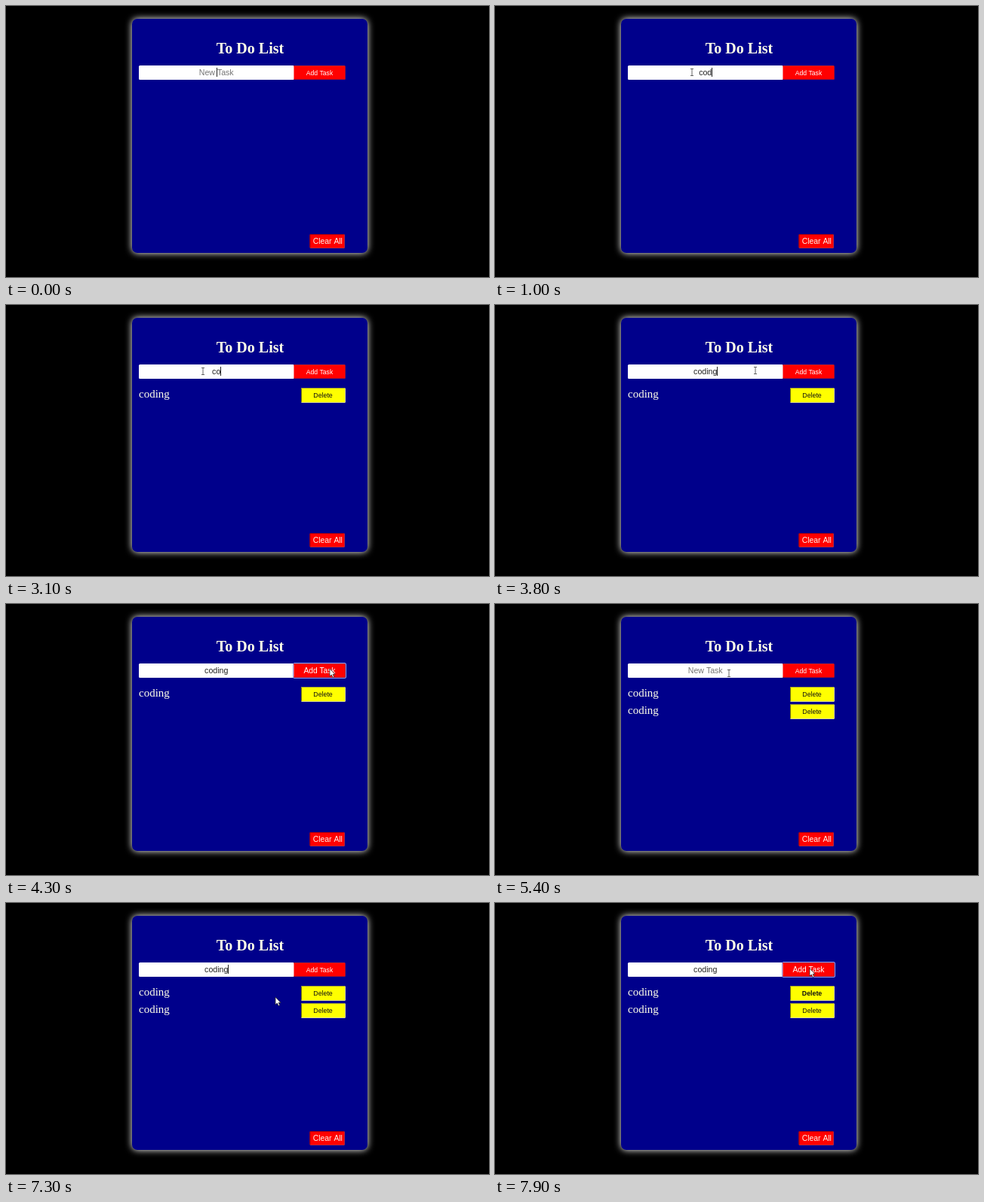
These frames come from a looping animation (640x360 px, 8 s). An HTML page with a canvas:

```html
<!DOCTYPE html>
<html lang="en">
<head>
<meta charset="utf-8">
<title>To Do List</title>
<style>
html, body { margin: 0; width: 100%; height: 100%; overflow: hidden; background: #000; }
canvas { display: block; }
</style>
</head>
<body>
<canvas id="stage" width="640" height="360"></canvas>
<script>
const ctx = document.getElementById('stage').getContext('2d');
const SANS = '"Liberation Sans", Arial, sans-serif';
const SERIF = '"Liberation Serif", "Times New Roman", serif';
const LOOP = 8000, STEP = 100, MID = 278.7;

// [time, text in the field]
const typing = [
  [0, ''], [800, 'c'], [900, 'co'], [1000, 'cod'], [1100, 'codi'], [1200, 'codin'], [1300, 'coding'],
  [1800, ''], [2800, 'c'], [3100, 'co'], [3200, 'cod'], [3300, 'codi'], [3400, 'codin'], [3500, 'coding'],
  [4600, ''], [6400, 'c'], [6500, 'co'], [6700, 'cod'], [6800, 'codi'], [6900, 'codin'], [7100, 'coding']
];
// [time, x, y] of the pointer
const path = [
  [0, 279, 88], [100, 279, 88], [300, 261, 88], [3500, 261, 88], [4100, 429, 86], [4900, 429, 86],
  [5400, 310, 92], [7100, 310, 92], [7300, 357, 125], [7600, 403, 118], [7800, 417, 87], [8000, 417, 87]
];

const latest = (list, t) => list.filter(k => k[0] <= t).pop();

function pointerAt(t) {
  const i = path.findIndex(k => k[0] > t);
  const [t0, x0, y0] = path[i - 1], [t1, x1, y1] = path[i];
  const p = (t - t0) / (t1 - t0);
  return { x: x0 + (x1 - x0) * p, y: y0 + (y1 - y0) * p };
}

function box(x, y, w, h, r, color) {
  ctx.fillStyle = color;
  ctx.beginPath();
  ctx.roundRect(x, y, w, h, r);
  ctx.fill();
}

function label(str, x, y, font, color, align = 'center') {
  ctx.font = font;
  ctx.textAlign = align;
  ctx.fillStyle = color;
  ctx.fillText(str, x, y);
  return ctx.measureText(str).width;
}

function button(x, y, w, h, color, left, top, shade) {
  box(x, y, w, h, 1.5, shade);
  box(x, y, w - 1, h - 1, 1, top);
  box(x, y + 1, w - 1, h - 2, 1, left);
  box(x + 1, y + 1, w - 2, h - 2, 0, color);
}

function arrow(x, y) {
  const tip = new Path2D('M0 0V10L2.3 8L4 11.5L5.7 10.7L4.1 7.4H7Z');
  ctx.save();
  ctx.translate(x, y);
  ctx.fillStyle = '#fff';
  ctx.strokeStyle = '#222';
  ctx.lineWidth = 0.7;
  ctx.fill(tip);
  ctx.stroke(tip);
  ctx.restore();
}

function beam(x, y) {
  ctx.strokeStyle = '#555';
  ctx.lineWidth = 0.9;
  ctx.stroke(new Path2D(`M${x - 2} ${y - 4.5}h4M${x} ${y - 4.5}v9M${x - 2} ${y + 4.5}h4`));
}

function draw(t) {
  const text = latest(typing, t)[1];
  const pointer = pointerAt(t);
  const over = (x, y, w, h) =>
    pointer.x >= x && pointer.x < x + w && pointer.y >= y && pointer.y < y + h;
  const hover = over(381, 79, 69, 19);
  const rows = t < 1800 ? 0 : t < 4600 ? 1 : 2;
  const pressed = t >= 4200 && t < 4900 || t >= 7900;
  const focused = t < 4200 || t >= 5600 && t < 7900;
  const typed = t - latest(typing, t)[0];

  ctx.fillStyle = '#000';
  ctx.fillRect(0, 0, 640, 360);
  ctx.shadowColor = '#fff';
  ctx.shadowBlur = 10;
  box(167, 17, 312, 311, 7, '#00008b');
  ctx.shadowBlur = 0;

  label('To Do List', 323.5, 63, `bold 20px ${SERIF}`, '#ffffe8');

  box(176, 79, 206, 19, 1.5, '#fff');
  const width = text
    ? label(text, MID, 92, `10.6px ${SANS}`, '#222')
    : (label('New Task', MID, 92, `10.6px ${SANS}`, '#757575'), 0);
  if (focused && typed % 1000 < 500) {
    ctx.fillStyle = '#222';
    ctx.fillRect(Math.round(MID + width / 2), 82, 1, 12);
  }

  if (pressed) box(380, 78, 71, 21, 2.5, '#8f9cf0');
  button(381, 79, 69, 19, '#f00', '#ff7070', '#b82030', '#a01030');
  label('Add Task', 415.5, hover ? 92 : 91.7, `${hover ? 10.2 : 8.6}px ${SANS}`, '#fff');

  for (let i = 0; i < rows; i++) {
    const y = 110 + i * 23;
    const strong = i === 0 && t >= 7500;
    label('coding', 176, y + 13, `15px ${SERIF}`, '#ffffe8', 'left');
    button(391, y, 59, 20, '#ff0', '#77770a', '#a0a030', '#d8d890');
    label('Delete', 420, y + 13, `${strong ? 'bold ' : ''}8.8px ${SANS}`, '#111');
  }

  button(402.5, 303, 46.5, 19, '#f00', '#a00010', '#a00010', '#b02840');
  label('Clear All', 426.3, 316, `10.4px ${SANS}`, '#fff0e8');

  if (over(176, 79, 205, 19)) {
    if (t >= 300) beam(Math.round(pointer.x), Math.round(pointer.y));
  } else arrow(pointer.x, pointer.y);
}

function frame() {
  const t = performance.now() % LOOP;
  draw(Math.floor(t / STEP) * STEP);
  requestAnimationFrame(frame);
}
frame();
</script>
</body>
</html>
```
